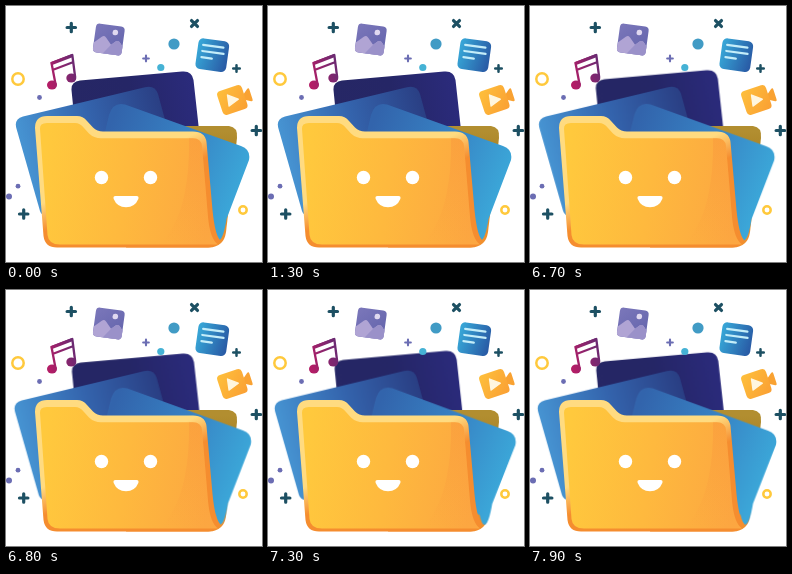
An HTML page that plays this animation: 256x256 px, repeating every 8000 ms.

```html
<!DOCTYPE html>
<html lang="en">
<head>
<meta charset="utf-8">
<title>Happy folder</title>
<style>
html, body { margin: 0; width: 100%; height: 100%; overflow: hidden; background: #fff; }
svg { display: block; width: 100vw; height: 100vh; }
.sheet { animation: spread 8s infinite; transform-origin: 213px 234px; }
.back { --x: 1.2px; --y: -4.8px; --r: 0deg; }
.left { --x: -3.3px; --y: -.3px; --r: 0deg; }
.right { --x: 3.6px; --y: .8px; --r: .7deg; }
@keyframes spread {
  0%, 78.8% { transform: none; animation-timing-function: cubic-bezier(.37, 0, .63, 1); }
  93.1% {
    transform: translate(var(--x), var(--y)) rotate(var(--r));
    animation-timing-function: cubic-bezier(.45, 0, .8, .65);
  }
  100% {
    transform: translate(calc(var(--x) * .5), calc(var(--y) * .5)) rotate(calc(var(--r) * .5));
  }
}
</style>
</head>
<body>
<svg viewBox="0 0 256 256">
  <defs>
    <linearGradient id="navy" x1="0" y1=".5" x2="1" y2=".3">
      <stop offset="0" stop-color="#262765"/><stop offset=".5" stop-color="#252666"/><stop offset="1" stop-color="#2b2b7c"/>
    </linearGradient>
    <linearGradient id="mid" gradientUnits="userSpaceOnUse" x1="12" y1="135" x2="155" y2="100">
      <stop offset="0" stop-color="#4795d3"/><stop offset=".5" stop-color="#3464ad"/><stop offset="1" stop-color="#2a3f84"/>
    </linearGradient>
    <linearGradient id="sky" gradientUnits="userSpaceOnUse" x1="108" y1="110" x2="240" y2="165">
      <stop offset="0" stop-color="#3264ac"/><stop offset=".5" stop-color="#3780c2"/><stop offset="1" stop-color="#3ba6d8"/>
    </linearGradient>
    <linearGradient id="rear" gradientUnits="userSpaceOnUse" x1="0" y1="125" x2="0" y2="235">
      <stop offset="0" stop-color="#b28e30"/><stop offset=".25" stop-color="#a88124"/><stop offset=".7" stop-color="#d98c28"/><stop offset="1" stop-color="#f1902e"/>
    </linearGradient>
    <linearGradient id="face" gradientUnits="userSpaceOnUse" x1="36" y1="160" x2="206" y2="185">
      <stop offset="0" stop-color="#ffc93d"/><stop offset=".5" stop-color="#feb93e"/><stop offset="1" stop-color="#fca741"/>
    </linearGradient>
    <linearGradient id="shade" gradientUnits="userSpaceOnUse" x1="185" y1="130" x2="175" y2="238">
      <stop offset="0" stop-color="#f9953c" stop-opacity=".45"/><stop offset="1" stop-color="#f9953c" stop-opacity="0"/>
    </linearGradient>
    <linearGradient id="rim" gradientUnits="userSpaceOnUse" x1="192" y1="126" x2="203" y2="150">
      <stop offset="0" stop-color="#ffdb80"/><stop offset="1" stop-color="#f58d2f"/>
    </linearGradient>
    <linearGradient id="doc" x1="0" y1=".4" x2="1" y2=".6">
      <stop offset="0" stop-color="#37a5d6"/><stop offset="1" stop-color="#295ca6"/>
    </linearGradient>
    <linearGradient id="pic" x1="0" y1="0" x2="1" y2="1">
      <stop offset="0" stop-color="#7b77ba"/><stop offset="1" stop-color="#6263ab"/>
    </linearGradient>
    <linearGradient id="film" x1="0" y1="0" x2="1" y2="1">
      <stop offset="0" stop-color="#fec03c"/><stop offset="1" stop-color="#fa9f33"/>
    </linearGradient>
    <linearGradient id="note" gradientUnits="userSpaceOnUse" x1="41" y1="70" x2="70" y2="62">
      <stop offset="0" stop-color="#b31d66"/><stop offset="1" stop-color="#6b2a72"/>
    </linearGradient>
    <path id="plus" d="M-4.2 0H4.2M0-4.2V4.2" fill="none" stroke-width="3.2" stroke-linecap="round"/>
  </defs>

  <path class="sheet back" fill="url(#navy)" d="M65.500 84Q65 75.500 74 74.500L176 65.500Q186 64.500 187.500 74L193 124V180H75Z"/>
  <path fill="url(#rear)" d="M150 120H223Q232 121 231 132L220 226Q218 241 203 241.500H120Z"/>
  <path class="sheet left" fill="url(#mid)" d="M10.300 122Q8 113 17 110.500L139 81.300Q149 79 152 88L164 132L150 185L42 210Q36 211 34 205Z"/>
  <path class="sheet right" fill="url(#sky)" d="M103 109Q107 95.500 119 98.500L235 140Q245 143.500 243 154L220.500 213Q217.500 232 213.500 234Q210.500 235 208 224L170 215L98 130Z"/>

  <path fill="url(#rim)" d="M29 122Q29 110 41 110H71Q77 110 81 115L87 121.500Q91 125.500 97 125.500H187Q199 125.500 200.500 136L206.500 204Q209 229 214 234Q210 241.500 202 241.500H51Q39 241.500 37.500 230Z"/>
  <path fill="url(#face)" d="M34 123Q33.500 117 41 117H69Q74 117 78 122L83 127.500Q88 132.300 95 132.300H187Q195 132.300 196 140L202 211Q204 233 212 238.500H54Q42.500 238.500 41.500 229Z"/>
  <path fill="url(#shade)" d="M183 132.300H187Q195 132.300 196 140L202 211Q204 233 212 238.500H153C174 221 184 182 183 132.300Z"/>
  <g fill="#fff">
    <circle cx="95.500" cy="171.500" r="6.700"/>
    <circle cx="144.500" cy="171.500" r="6.700"/>
    <path d="M109.500 190H130.500Q133.200 190 132.300 193Q129 201.200 120 201.200Q111 201.200 107.700 193Q106.800 190 109.500 190Z"/>
  </g>

  <g transform="translate(102.800 33.500) rotate(8)">
    <rect x="-14.500" y="-14.500" width="29" height="29" rx="4" fill="url(#pic)"/>
    <path fill="#b0a4d4" d="M-14.500 5L-7-2Q-5-3.500-3-1.500L3 5L7 1Q9-.500 11 1L14.500 5V10.500Q14.500 14.500 10.500 14.500H-10.500Q-14.500 14.500-14.500 10.500Z"/>
    <path fill="#9a91c9" d="M-4 14.500L3 5L7 1Q9-.500 11 1L14.500 5V10.500Q14.500 14.500 10.500 14.500Z"/>
    <circle cx="5.500" cy="-7.800" r="2.800" fill="#e0d9f0"/>
  </g>
  <g transform="translate(206.300 49.200) rotate(8)">
    <rect x="-15.500" y="-15.500" width="31" height="31" rx="5" fill="url(#doc)"/>
    <path d="M-10.500-9H10M-10.500-2.800H11M-10.500 3.400H0" stroke="#c4edf9" stroke-width="2.200" stroke-linecap="round"/>
  </g>
  <g transform="translate(226.300 94) rotate(-18)">
    <path d="M11-1L17.500-6Q19.500-7 19.500-4.500V5.500Q19.500 8 17.500 7L11 3Z" fill="#f9a232"/>
    <rect x="-13" y="-12.500" width="26" height="25" rx="4" fill="url(#film)"/>
    <path transform="rotate(10)" d="M-4-5.500L6 0L-4 5.500Z" fill="#fff6df" stroke="#fff6df" stroke-width="1.500" stroke-linejoin="round"/>
  </g>
  <g fill="url(#note)" stroke="url(#note)">
    <ellipse cx="46" cy="79" rx="5" ry="4.600" stroke="none"/>
    <ellipse cx="65.300" cy="72" rx="5" ry="4.600" stroke="none"/>
    <path fill="none" stroke-width="2.300" stroke-linejoin="round" d="M49.700 79L45.500 57L66.300 49L69.200 71.500M46.500 64L67.500 56"/>
    <path fill="none" stroke-width="3.200" d="M45 57.800L66.500 49.500"/>
  </g>

  <g stroke="#1d5063">
    <use href="#plus" x="65.300" y="21.500"/>
    <use href="#plus" x="17.700" y="208"/>
    <use href="#plus" x="250.300" y="124.500"/>
    <use href="#plus" transform="translate(230.500 62.500) scale(.78)"/>
    <use href="#plus" transform="translate(188.500 17.500) rotate(45)"/>
  </g>
  <use href="#plus" transform="translate(140 52.500) scale(.67)" stroke="#6b6db3"/>
  <g fill="none" stroke="#ffc93c" stroke-width="2.500">
    <circle cx="12" cy="73" r="5.700"/>
    <circle cx="237" cy="204" r="3.700"/>
  </g>
  <circle cx="168" cy="38" r="5.600" fill="#419bc5"/>
  <circle cx="154.800" cy="61.500" r="3.600" fill="#45b2d5"/>
  <g fill="#6b6db3">
    <circle cx="33.500" cy="91.500" r="2.400"/>
    <circle cx="12" cy="180.200" r="2.400"/>
    <circle cx="3" cy="190.500" r="3"/>
  </g>
</svg>
</body>
</html>
```
